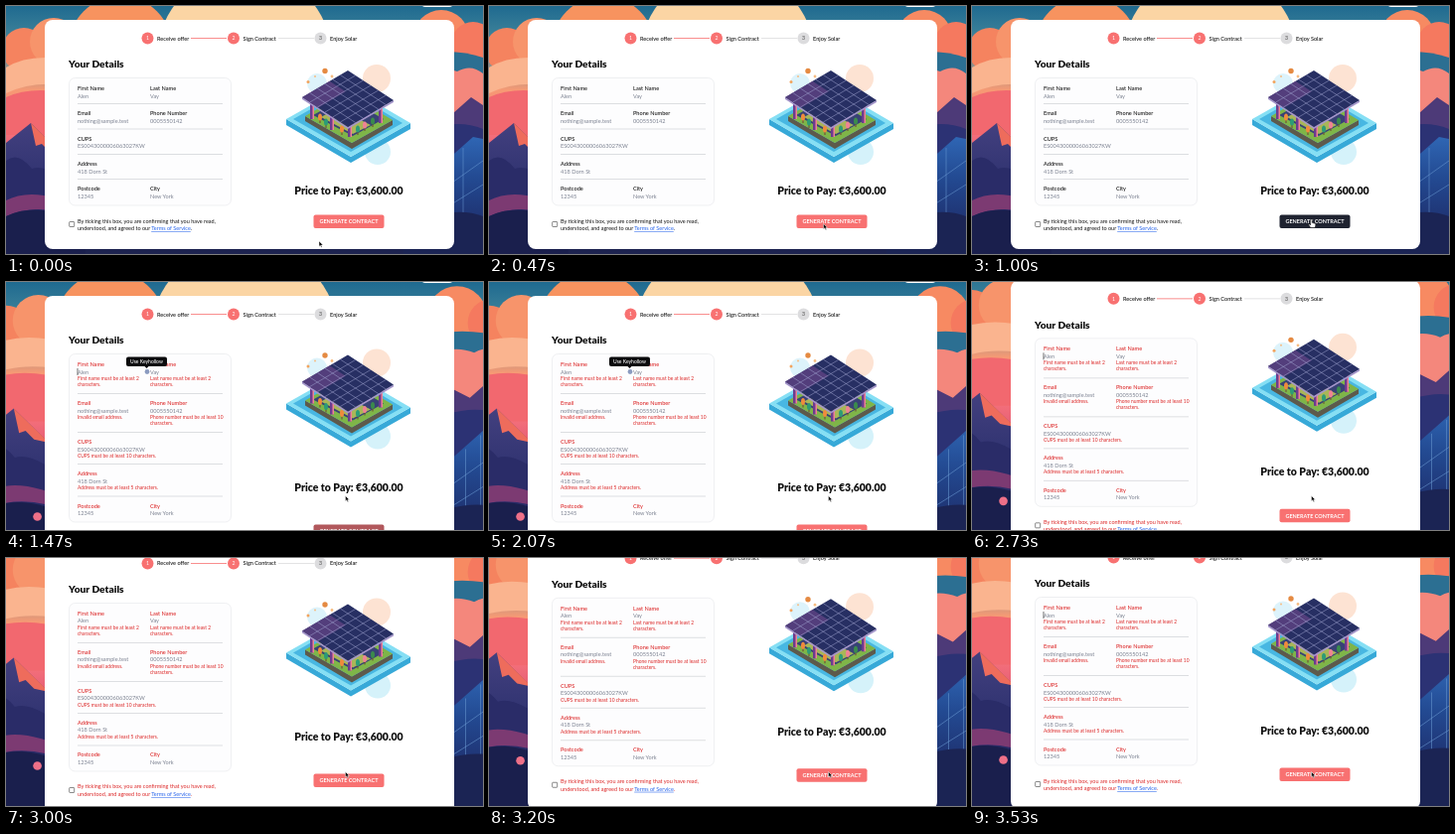
An HTML page for the animation above (3590 ms loop, 480x250 px).

```html
<!DOCTYPE html>
<html lang="en">
<head>
<meta charset="utf-8">
<title>Solar contract form</title>
<style>
html, body { margin: 0; width: 100%; height: 100%; overflow: hidden; background: #1d2350; }
svg { display: block; width: 480px; height: 250px; font-family: Lato, sans-serif; }
</style>
</head>
<body>
<svg id="stage" viewBox="0 0 480 250"></svg>
<script>
const LOOP = 3590, HOVER = 500, CLICK = 1370, SCROLL = 2200;
const CORAL = '#f87171', RED = '#dc2626', INK = '#111', GREY = '#7b8190';

const clamp = v => Math.max(0, Math.min(1, v));
const ease = (t, a, b) => { const u = clamp((t - a) / (b - a)); return u * u * (3 - 2 * u); };
const mix = (a, b, u) => `rgb(${a.map((v, i) => Math.round(v + (b[i] - v) * u))})`;

const text = (x, y, s, size, fill = INK, weight = 400, extra = '') =>
  `<text x="${x}" y="${y}" font-size="${size}" fill="${fill}" font-weight="${weight}" ${extra}>${s}</text>`;
const rect = (x, y, w, h, r, fill, extra = '') =>
  `<rect x="${x}" y="${y}" width="${w}" height="${h}" rx="${r}" fill="${fill}" ${extra}/>`;
const circle = (x, y, r, fill) => `<circle cx="${x}" cy="${y}" r="${r}" fill="${fill}"/>`;
const path = (d, fill, extra = '') => `<path d="${d}" fill="${fill}" ${extra}/>`;
const stroke = (d, color, width) => path(d, 'none', `stroke="${color}" stroke-width="${width}"`);
const gradient = (id, ...colors) => `<linearGradient id="${id}" x2="0" y2="1">${
  colors.map((c, i) => `<stop offset="${i / (colors.length - 1)}" stop-color="${c}"/>`).join('')}</linearGradient>`;
const middle = 'text-anchor="middle"';

// The sides reach under the card, because the cover image grows with the page.
const landscape = `
  ${gradient('sky', '#1f6a90', '#4a8c9d', '#f79a74', '#f4707a', '#d94f74')}
  ${gradient('hill', '#43407f', '#2a2f6c', '#1a2150')}
  ${gradient('panel', '#2f66b4', '#234a92', '#1f3474')}
  ${rect(0, 0, 480, 170, 0, 'url(#sky)')}
  ${circle(115, 42, 52, '#f7935f')}${circle(240, 52, 88, '#fbd5a4')}
  ${circle(18, 44, 22, '#f5835f')}${circle(48, 36, 24, '#f7946b')}
  ${path('M0 62Q28 44 80 58V84Q34 72 0 88Z', '#fab48f')}
  ${path('M0 92Q30 78 80 92V130H0Z', '#f2686f')}
  ${circle(438, 32, 28, '#f78a62')}${circle(470, 38, 22, '#f5795f')}
  ${path('M400 52Q446 40 480 52V72H400Z', '#2c6f92')}
  ${path('M400 76Q430 56 454 66Q468 58 480 68V112H400Z', '#f4877c')}
  ${path('M0 138L25 118L80 172V270H0Z', 'url(#hill)')}
  ${path('M25 118L58 150L44 147L36 139L30 141Z', '#ee6c5c')}
  ${path('M0 156Q12 146 26 164Q44 158 80 190V270H0Z', '#2a2c68')}
  ${path('M0 196Q30 180 80 206V216Q34 196 0 212Z', '#7c3a72')}
  ${path('M0 212Q34 196 80 220V270H0Z', '#1a1f4d')}
  ${circle(47, 219, 4, '#ee7088')}
  ${path('M400 124L430 98L450 108L468 92L480 100V270H400Z', '#4d3a78')}
  ${path('M400 136Q446 110 480 124V270H400Z', '#2c3274')}
  ${path('M425 172L470 132L480 134V214H425Z', 'url(#panel)')}
  ${stroke('M432 190L480 156M432 210L480 180M446 156V212M460 143V212', '#6f9fd6', .5)}
  ${path('M400 222Q450 200 480 212V270H400Z', '#1b2454')}`;

// Points on the panel plane; u and v run from 0 to 1.
const onPanel = (u, v) => `${298 + 46 * u + 46 * v} ${92 - 27 * u + 30 * v}`;
let panelGrid = '';
for (let i = 1; i < 6; i++)
  panelGrid += `M${onPanel(0, i / 6)}L${onPanel(1, i / 6)}M${onPanel(i / 6, 0)}L${onPanel(i / 6, 1)}`;

const pillar = (x, y, h) => rect(x, y, 4, h, 0, '#6b3c8f') + rect(x + 2.5, y, 1.5, h, 0, '#ef8295');
const tree = (x, y, leaf) => rect(x - .5, y, 1, 5, 0, '#704332') +
  `<ellipse cx="${x}" cy="${y - 1}" rx="2" ry="3.6" fill="${leaf}"/>`;

const house = `
  ${circle(373, 73, 14, '#fde3d3')}${circle(374, 147, 13, '#d5f2fa')}${circle(313, 78, 10, '#ddf3fb')}
  ${circle(321, 65.5, 2.7, '#e58a42')}${circle(304, 76.5, 1.5, '#f3a45e')}
  ${circle(311, 71, 1, '#f6bd83')}${circle(328, 71, 1.4, '#f6bd83')}
  ${path('M282 114L347 152L407 118V124L347 158L282 120Z', '#37a9d8')}
  ${path('M282 114L342 80L407 118L347 152Z', '#86dff4')}
  ${path('M289 114L342 84L399 118L347 147Z', '#48b7e2')}
  ${path('M301 111L348 138L389 115V120L348 144L301 116Z', '#5d5a4c')}
  ${path('M301 111L342 87L389 115L348 138Z', '#7fb548')}
  ${path('M309 110L342 92L380 114L349 131Z', '#384275')}
  ${path('M317 112L333 103L367 120L349 129Z', '#a9b658')}
  ${pillar(306, 94, 20)}${pillar(326, 105, 20)}${pillar(344, 117, 15)}${pillar(375, 101, 17)}
  ${tree(316, 113, '#f08b3c')}${tree(322, 118, '#2c9c76')}${tree(338, 125, '#f08b3c')}
  ${tree(354, 125, '#2c9c76')}${tree(361, 121, '#ef8295')}${tree(369, 117, '#3b8b4c')}
  ${path(`M${onPanel(0, 0)}L${onPanel(0, 1)}L${onPanel(1, 1)}v2L344 124L298 94Z`, '#a596cb')}
  ${path(`M${onPanel(0, 0)}L${onPanel(1, 0)}L${onPanel(1, 1)}L${onPanel(0, 1)}Z`, '#272f63')}
  ${path(`M${onPanel(0, 0)}L${onPanel(.6, 0)}L${onPanel(.6, .35)}L${onPanel(0, .35)}Z`, '#6a478b', 'opacity=".65"')}
  ${stroke(panelGrid, '#a3a6d3', .5)}`;

function stepper() {
  const steps = [[142.5, 'Receive offer', CORAL], [229, 'Sign Contract', CORAL], [316.5, 'Enjoy Solar', '#dcdcde']];
  return stroke('M186 32.5H222', CORAL, .8) + stroke('M274 32.5H310', '#dcdcde', .8) +
    steps.map(([x, label, fill], i) => circle(x, 32.5, 6, fill) +
      text(x, 34.4, i + 1, 5.2, i < 2 ? '#fff' : '#444', 400, middle) +
      text(x + 9.5, 34.5, label, 5.6, INK, 500)).join('');
}

// Each row: label position when valid, when invalid, then [label, value, error lines].
const rows = [
  [83, 83, ['First Name', 'Alen', 'First name must be at least 2', 'characters.'],
           ['Last Name', 'Vay', 'Last name must be at least 2', 'characters.']],
  [108, 122, ['Email', 'nothing@sample.test', 'Invalid email address.'],
             ['Phone Number', '0005550142', 'Phone number must be at least 10', 'characters.']],
  [133.5, 161, ['CUPS', 'ES0043000006063027KW', 'CUPS must be at least 10 characters.']],
  [159, 193, ['Address', '418 Dorn St', 'Address must be at least 5 characters.']],
  [184, 225.5, ['Postcode', '12345'], ['City', 'New York']]
];

function form(invalid) {
  const color = invalid ? RED : INK;
  let out = text(63, 62.3, 'Your Details', 10.2, INK, 900) +
    rect(63.5, 72.5, 163, invalid ? 169.5 : 128.5, 6, '#fdfdfe', 'stroke="#e9eaed" stroke-width=".7"');
  rows.forEach((row, i) => {
    const y = row[invalid ? 1 : 0];
    row.slice(2).forEach(([label, value, ...errors], col) => {
      const x = 72 + 73 * col;
      out += text(x, y + 2, label, 5.6, color, 500) + text(x, y + 9.5, value, 5.6, GREY);
      if (invalid) errors.forEach((s, n) => out += text(x, y + 15.8 + 6.3 * n, s, 4.9, RED));
    });
    if (i < 4) out += stroke(`M72 ${rows[i + 1][invalid ? 1 : 0] - 9.5}H218`, '#cfd1d6', .7);
  });
  const y = invalid ? 41 : 0;
  return out + rect(63.7, 217.5 + y, 5, 5, .6, '#fff', 'stroke="#555" stroke-width=".7"') +
    text(72, 218.5 + y, 'By ticking this box, you are confirming that you have read,', 5.5, color) +
    text(72, 226 + y, 'understood, and agreed to our<tspan dx="1.5" fill="#2563eb" text-decoration="underline">Terms of Service</tspan>.', 5.5, color);
}

function offer(invalid, hover) {
  const y = invalid ? 34 : 0;
  return `<g transform="translate(0 ${invalid ? 8.5 : 0})">${house}</g>` +
    text(345, 190 + (invalid ? 21 : 0), 'Price to Pay: €3,600.00', 10.5, INK, 900, middle) +
    rect(309.5, 210.5 + y, 71, 13.5, 2, mix([248, 113, 113], [31, 35, 48], hover)) +
    text(345, 219.2 + y, 'GENERATE CONTRACT', 5.5, '#fff', 700, middle);
}

const passwordHint = rect(121, 75.5, 41, 9.5, 2, '#0b0b0d') +
  text(141.5, 82, 'Use Keyhollow', 5, '#fff', 500, middle) + path('M139.5 85h4l-2 2Z', '#0b0b0d') +
  circle(142, 90.5, 2.4, '#8b9bc0');

function pointer(x, y, hand) {
  const d = hand
    ? 'M-.8 0Q0 -.9 .8 0V3L3.8 3.8Q4.6 4.2 4.3 5.6L3.6 8H-.6L-3 4.9Q-2.4 4 -.8 5.2Z'
    : 'M0 0V5.4L1.3 4.3L2.2 6.3L3.1 5.9L2.3 4H4Z';
  return `<g transform="translate(${x} ${y})">${path(d, hand ? '#fff' : '#000', `stroke="${hand ? '#000' : '#fff'}" stroke-width=".5"`)}</g>`;
}

function scene(t) {
  const invalid = t >= CLICK;
  const scroll = 33 * ease(t, SCROLL, 3300);
  const hover = clamp((t - HOVER) / 150) - clamp((t - CLICK) / 150);
  const move = ease(t, 0, HOVER + 150);
  const zoom = invalid ? 1.08 : 1;
  const caret = invalid && (t - CLICK) % 1000 < 500;
  return `<g transform="translate(0 ${-scroll})">
    <g transform="translate(${240 - 240 * zoom} 0) scale(${zoom})">${landscape}</g>
    ${rect(418, -8, 32, 9, 4, '#fff')}
    ${rect(39, 14, 412, invalid ? 272 : 231, 8, '#fff')}
    ${stepper()}${form(invalid)}${offer(invalid, hover)}
    ${caret ? stroke('M72 87V94', INK, .6) : ''}
    ${invalid && t < SCROLL ? passwordHint : ''}
  </g>` + pointer(315 + 26.5 * move, 237 - 21.5 * move, t > HOVER && !invalid);
}

const stage = document.getElementById('stage');
const start = performance.now();
function draw() {
  stage.innerHTML = scene((performance.now() - start) % LOOP);
  requestAnimationFrame(draw);
}
draw();
</script>
</body>
</html>
```
